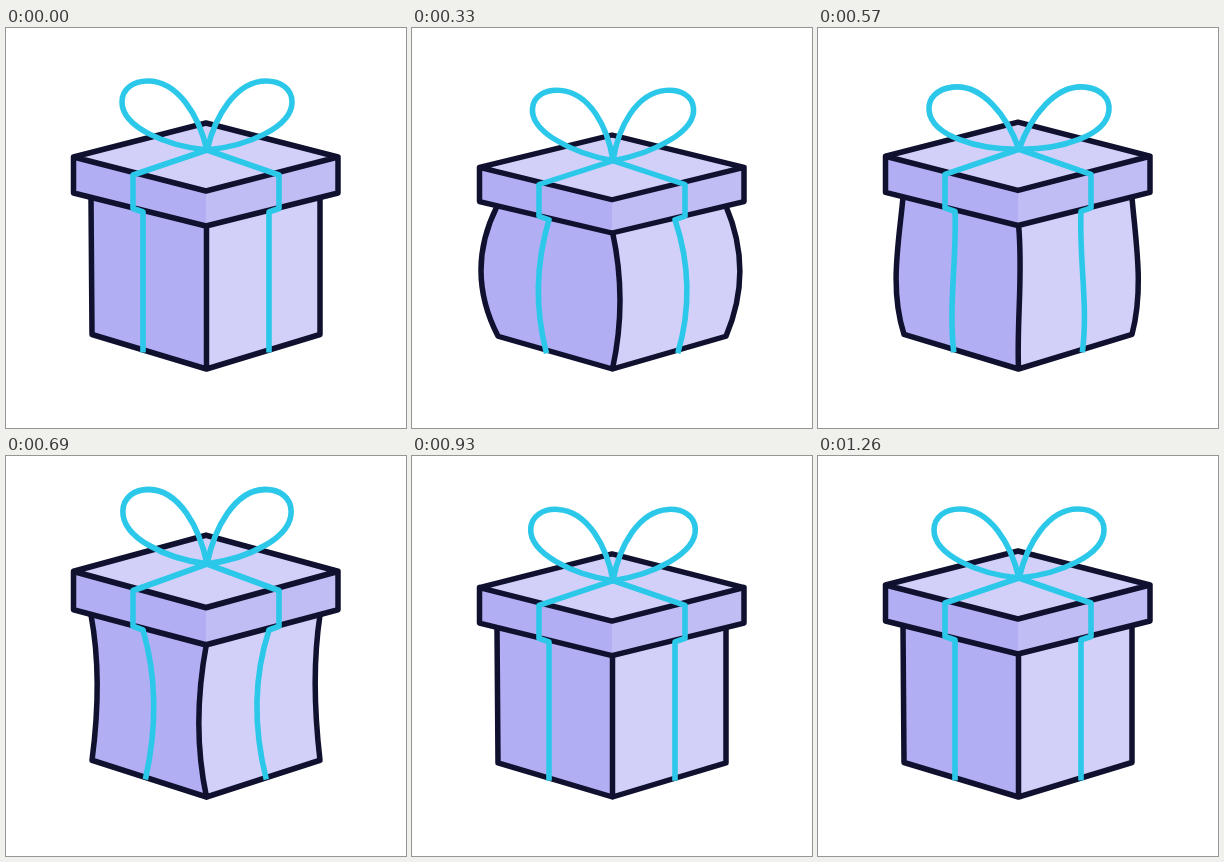
An HTML page for the animation above (1.32 s loop, 400 by 400 pixels).

```html
<!DOCTYPE html>
<html lang="en">
<head>
<meta charset="utf-8">
<title>Bouncing gift box</title>
<style>
  html, body { margin: 0; width: 100%; height: 100%; overflow: hidden; background: #fff; }
  svg { display: block; width: 100vw; height: 100vh; }
  .line { fill: none; stroke: #10102f; stroke-width: 5.5; stroke-linejoin: round; stroke-linecap: round; }
  .ribbon { fill: none; stroke: #2cc8ea; stroke-width: 5.6; stroke-linejoin: round; }
</style>
</head>
<body>
<svg viewBox="0 0 400 400">
  <g id="box">
    <path id="faceL" fill="#b1aef3"/>
    <path id="faceR" fill="#d2d0f8"/>
    <path id="edges" class="line"/>
    <path fill="#d2d0f8" d="M67.5 129L200 95L332 129L200 163Z"/>
    <path fill="#b1aef3" d="M67.5 129L200 163V198L67.5 165Z"/>
    <path fill="#c0bdf5" d="M332 129L200 163V198L332 165Z"/>
    <path class="line" d="M67.5 129L200 95L332 129L200 163ZV165L200 198L332 165V129"/>
    <path id="bands" class="ribbon"/>
    <path id="loopL" class="ribbon" d="M201 122C160 118 116 99 116 74C116 61 127 53 142 53C172 53 193 88 201 122Z"/>
    <path id="loopR" class="ribbon" d="M201 122C242 118 286 99 286 74C286 61 275 53 260 53C230 53 209 88 201 122Z"/>
  </g>
</svg>
<script>
const LOOP = 1320, STEP = 30, LAST = 1260, FLOOR = 341;

const ease = u => (1 - Math.cos(Math.PI * u)) / 2;

// Sine-eased motion through [time, value] poses.
function track(poses, t) {
  const i = poses.findIndex(p => p[0] > t);
  if (i < 0) return poses[poses.length - 1][1];
  const [t0, v0] = poses[i - 1], [t1, v1] = poses[i];
  return v0 + (v1 - v0) * ease((t - t0) / (t1 - t0));
}

// Squash, stretch, settle.
const squash = t => track([[0, 1], [380, .949], [445, .949], [705, 1.065], [930, .988], [LAST, 1]], t);

// The bow trails behind the lid.
const tilt = t => track([[0, 0], [200, 5], [330, 5], [570, -6.5], [760, 4.2], [LAST, 0]], t);

// Sides swell, let go at the given time, recoil inwards and straighten.
const swell = (t, release, recoil) =>
  track([[0, 0], [280, 1], [release, 1], [release + 240, -recoil], [930, 0]], t);
const EARLY = 440, LATE = 490, SOFT = .4, STRONG = 1.1;

const el = id => document.getElementById(id);
const set = (id, name, value) => el(id).setAttribute(name, value);

// Bezier segment from (x0,y0) to (x1,y1) with sideways pulls a and b.
function bend(x0, y0, x1, y1, a, b) {
  const dx = (x1 - x0) / 3, dy = (y1 - y0) / 3;
  return `C${x0 + dx + a} ${y0 + dy} ${x1 - dx + b} ${y1 - dy} ${x1} ${y1}`;
}

function draw(t) {
  const sideTop = swell(t, EARLY, SOFT), sideLow = swell(t, LATE, SOFT);
  const early = swell(t, EARLY, STRONG), late = swell(t, LATE, STRONG);

  const side = (x0, x1, pull) =>
    `M${x0} 170` + bend(x0, 170, x1, 306.5, pull * sideTop, pull * sideLow) + "L200.5 341";
  const left = side(85, 86, -22), right = side(314, 314, 18.5);
  const middle = bend(200.5, 341, 200.5, 197, 10 * early, 10 * late);
  set("faceL", "d", left + middle + "Z");
  set("faceR", "d", right + middle + "Z");
  set("edges", "d", left + middle + right);

  const band = (edge, x, pull) => `M201 122L${edge} 147V180.5L${x} 184` +
    bend(x, 184, x + .2 * pull * late, 324.5, pull * early, pull * late);
  set("bands", "d", band(127, 137, -12.5) + band(273, 263, 14));

  const angle = tilt(t), s = squash(t);
  set("loopL", "transform", `rotate(${angle} 201 122)`);
  set("loopR", "transform", `rotate(${-angle} 201 122)`);
  set("box", "transform", `translate(0 ${FLOOR * (1 - s)}) scale(1 ${s})`);
}

const start = performance.now();
function tick(now) {
  const t = Math.max(0, now - start) % LOOP;
  draw(Math.min(LAST, Math.floor(t / STEP) * STEP));
  requestAnimationFrame(tick);
}
draw(0);
requestAnimationFrame(tick);
</script>
</body>
</html>
```
